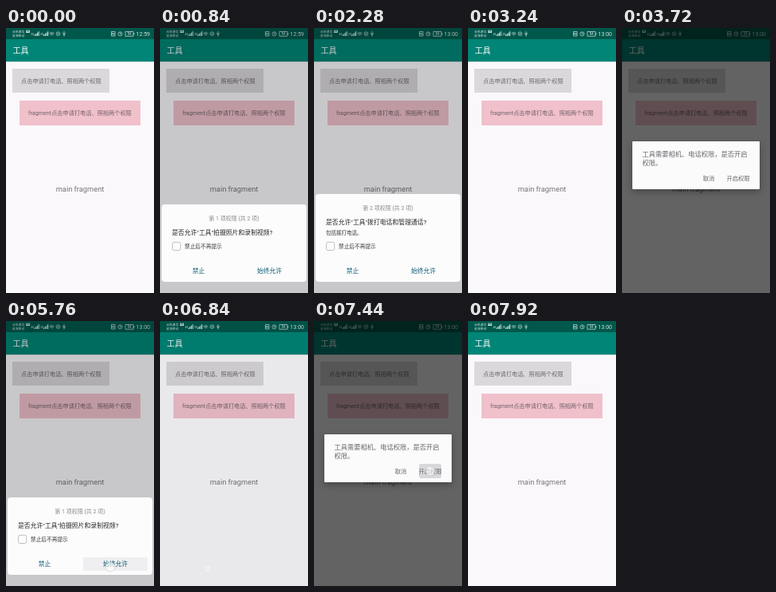
Recreate the animation shown at these times as an HTML page with a canvas. Size 186x332 px, loop 8 s.

```html
<!DOCTYPE html>
<html lang="zh-CN">
<head>
<meta charset="utf-8">
<style>
html, body { margin: 0; width: 100%; height: 100%; overflow: hidden; background: #faf8fb }
canvas { display: block; width: 186px; height: 332px }
</style>
</head>
<body>
<canvas id="stage"></canvas>
<script>
const W = 186, H = 332, LOOP = 8000, STEP = 120, TAP = 360;
const canvas = document.getElementById('stage');
const c = canvas.getContext('2d');
const ratio = Math.max(1, window.devicePixelRatio || 1);
canvas.width = W * ratio;
canvas.height = H * ratio;

// Each permission dialog opens, turns to its second question and closes
const permissions = [
  { open: 360, turn: 1800, close: 2880 },
  { open: 4680, turn: 5880, close: 6600 }
];
const rationales = [{ open: 3240, close: 4440 }, { open: 6840, close: 7560 }];

const spots = { open: [70, 69], deny: [60, 310], allow: [131, 308], enable: [146, 188] };
const taps = [
  [240, 'open'], [1680, 'deny'], [2880, 'deny'], [4320, 'enable'],
  [5760, 'allow'], [6600, 'deny'], [7440, 'enable']
];

const ramp = (t, start, length) => Math.min(1, Math.max(0, (t - start) / length));
const shown = (t, d, out) => Math.min(ramp(t, d.open, 480), 1 - ramp(t, d.close, out));

function rect(x, y, w, h, fill, r = 0) {
  c.fillStyle = fill;
  c.beginPath();
  c.roundRect(x, y, w, h, r);
  c.fill();
}

function box(x, y, w, h, color, r = 0, width = .7) {
  c.strokeStyle = color;
  c.lineWidth = width;
  c.beginPath();
  c.roundRect(x, y, w, h, r);
  c.stroke();
}

function line(points, color) {
  c.strokeStyle = color;
  c.lineWidth = .7;
  c.beginPath();
  points.forEach(([x, y]) => c.lineTo(x, y));
  c.stroke();
}

function ring(x, y, r, color, from = 0, to = Math.PI * 2) {
  c.strokeStyle = color;
  c.lineWidth = .7;
  c.beginPath();
  c.arc(x, y, r, from, to);
  c.stroke();
}

// y is the visual middle of the line
function text(s, x, y, size, color, align = 'left', weight = 400) {
  c.font = `${weight} ${size}px Roboto, "Noto Sans CJK SC", "Noto Sans CJK", sans-serif`;
  c.textAlign = align;
  c.fillStyle = color;
  c.fillText(s, x, y + size * .37);
}

function dim(a) {
  c.globalAlpha = a;
  rect(0, 0, W, H, '#000');
  c.globalAlpha = 1;
}

function statusBar(t) {
  const ink = '#cfe3e0';
  rect(0, 0, W, 14, '#00574b');
  text('云帆通信', 8, 4.6, 3.8, ink);
  text('星海移动', 8, 9.8, 3.8, ink);
  rect(25, 2.5, 5, 3.6, ink, .6);
  text('HD', 27.5, 4.3, 2.8, '#00574b', 'center', 700);
  ['46', '2G'].forEach((label, n) => {
    const x = 31.5 + n * 11.5;
    text(label, x, 7.5, 3.5, ink);
    for (let i = 0; i < 4; i++) rect(x + 4 + i * 1.7, 8.5 - i * 1.4, 1.1, 1.4 + i * 1.4, ink);
  });
  for (let r = 1.3; r < 5; r += 1.5) ring(57.5, 10, r, ink, -Math.PI * .75, -Math.PI * .25);
  ring(65.5, 7.2, 2.3, ink);
  rect(64.7, 6.4, 1.6, 1.6, ink, .8);
  line([[73, 4], [73, 10.5]], ink);
  line([[71.3, 6], [73, 9], [74.7, 6]], ink);
  box(132.5, 4.5, 4.5, 5.5, ink);
  line([[133.6, 8.5], [133.6, 6], [135.8, 8.5], [135.8, 6]], ink);
  ring(143.5, 7.4, 2.5, ink);
  line([[143.5, 5.7], [143.5, 7.5], [144.8, 7.5]], ink);
  box(150, 4.5, 10, 5.8, ink);
  rect(160.3, 6.2, 1, 2.4, ink);
  text('54', 155, 7.4, 4.6, ink, 'center');
  text(t < 1680 ? '12:59' : '13:00', 181, 7.3, 7, ink, 'right');
}

function page(t, pressed) {
  rect(0, 0, W, H, '#faf8fb');
  rect(0, 42, W, 1, '#dedfe0');
  rect(0, 14, W, 28, '#008577');
  statusBar(t);
  text('工具', 8.5, 28.5, 10, '#fff', 'left', 500);
  rect(8, 51, 122, 30, pressed === 'open' ? '#c8c5c8' : '#dbd8db');
  text('点击申请打电话、照相两个权限', 19, 66, 7.2, '#6d686b');
  rect(17, 91, 152, 31, '#f0c0cb');
  text('fragment点击申请打电话、照相两个权限', 28, 106.5, 7.2, '#74636a');
  text('main fragment', 93, 202, 9.3, '#777479', 'center');
}

function permissionDialog(a, k, pressed) {
  const shift = 13 * k, teal = '#105f73';
  c.save();
  c.translate(0, (1 - a) * 12);
  c.globalAlpha = a;
  rect(2, 221 - shift, 182, 97 + shift, '#fdfcfd', 4);
  ['拍摄照片和录制视频', '拨打电话和管理通话'].forEach((what, i) => {
    c.globalAlpha = a * (i ? k : 1 - k);
    text(`第 ${i + 1} 项权限 (共 2 项)`, 93, 238 - shift, 7, '#8a888b', 'center');
    text(`是否允许"工具"${what}?`, 15, 256 - shift, 7.85, '#29282a');
  });
  c.globalAlpha = a * k;
  text('包括拨打电话。', 15, 257, 6.5, '#333');
  c.globalAlpha = a;
  box(15.5, 268.3, 10.2, 10.2, '#b0aeb2', 2, .8);
  text('禁止后不再提示', 31, 273.5, 6.7, '#333');
  if (pressed) rect(pressed === 'allow' ? 97 : 8, 296, 81, 17, '#efeef0', 1.5);
  text('禁止', 48.5, 304.5, 7.8, teal, 'center', 500);
  text('始终允许', 137.5, 304.5, 7.8, teal, 'center', 500);
  c.restore();
}

function rationaleDialog(a, pressed) {
  c.save();
  c.globalAlpha = a;
  c.shadowColor = 'rgba(0, 0, 0, .3)';
  c.shadowBlur = 9 * ratio;
  c.shadowOffsetY = 3 * ratio;
  rect(13, 142, 160, 60, '#fcfbfc', 1);
  c.shadowColor = 'transparent';
  text('工具需要相机、电话权限，是否开启', 25.5, 157.5, 8.25, '#69676b');
  text('权限。', 25.5, 168.5, 8.25, '#69676b');
  if (pressed) rect(132, 179, 28, 18, '#d8d8dc', 2);
  text('取消', 109, 188, 7.3, '#69676b', 'center');
  text('开启权限', 146, 188, 7.3, '#69676b', 'center');
  c.restore();
}

function touch(x, y, a) {
  c.globalAlpha = a;
  rect(x - 6, y - 6, 12, 12, '#fff', 6);
  c.globalAlpha = a * .5;
  ring(x, y, 6, '#777');
  c.globalAlpha = 1;
}

function draw(t) {
  const tap = taps.find(([at]) => t >= at && t < at + TAP);
  const pressed = tap && tap[1];
  c.setTransform(ratio, 0, 0, ratio, 0, 0);
  page(t, pressed);
  for (const d of permissions) {
    dim(.2 * shown(t, d, 360));
    const a = shown(t, d, 240);
    if (a > 0) permissionDialog(a, ramp(t, d.turn, 480), pressed === 'open' ? '' : pressed);
  }
  for (const d of rationales) {
    dim(.6 * shown(t, d, 280));
    const a = shown(t, d, 155);
    if (a > 0) rationaleDialog(a, pressed === 'enable');
  }
  if (tap) touch(...spots[pressed], .6 * (1 - ramp(t, tap[0], TAP)));
}

function frame(now) {
  draw(Math.floor(now % LOOP / STEP) * STEP);
  requestAnimationFrame(frame);
}
requestAnimationFrame(frame);
</script>
</body>
</html>
```
